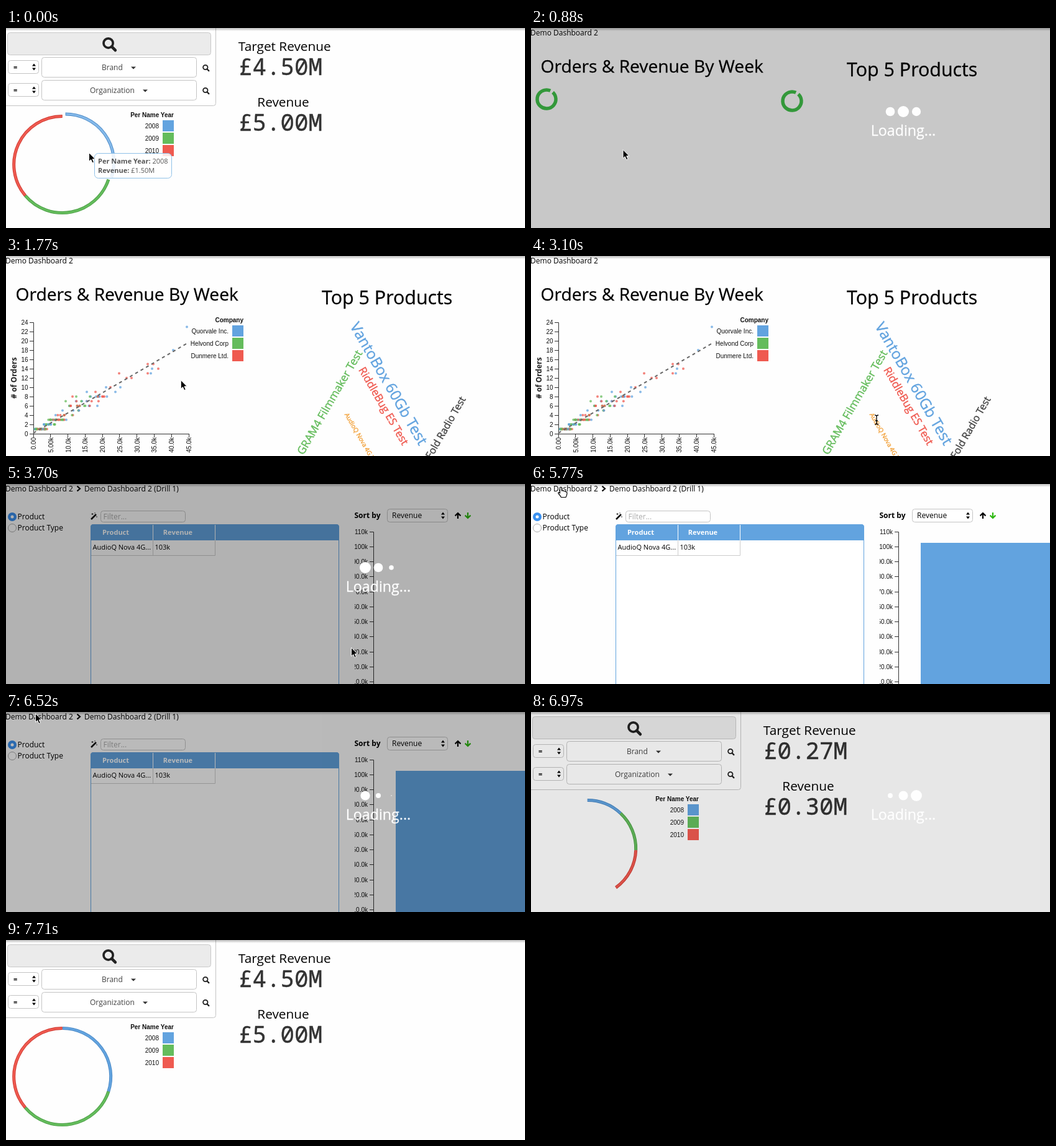
Write an HTML page that moves like this. It is 835 px wide and 323 px high and loops after 8310 ms.

```html
<!DOCTYPE html>
<html lang="en">
<head>
<meta charset="utf-8">
<title>Dashboard drill-down</title>
<style>
  html, body { margin: 0; width: 100%; height: 100%; overflow: hidden; background: #fefefe; }
  svg { display: block; width: 835px; height: 323px; }
  text { font: 12px "Open Sans", "Noto Sans", sans-serif; fill: #000; white-space: pre; }
  .axis text, .legend text { font: 10px "Liberation Sans", Arial, sans-serif; fill: #111; }
  .legend text { text-anchor: end; }
  .legend .head { font-weight: bold; }
  .axis path { stroke: #333; fill: none; }
  .end { text-anchor: end; }
  .mid { text-anchor: middle; }
  .bold { font-weight: bold; }
  .grey { fill: #444; }
  .box { fill: #fff; stroke: #c4c4c4; }
  .title { stroke: #000; stroke-width: .3; }
  .kpi { font-size: 20.8px; }
  .num { font: 37.5px "Noto Sans Mono", "DejaVu Sans Mono", monospace; fill: #333; stroke: #333; stroke-width: .4; }
  .tip text { font-size: 11px; fill: #555; }
  .th { font-size: 11px; font-weight: bold; fill: #fff; text-anchor: middle; }
  .td { font-size: 11px; }
  .cloud text { dominant-baseline: central; stroke-width: .4; }
  .ring { fill: none; stroke: #40c149; stroke-width: 5.5; stroke-dasharray: 89 5.25; }
</style>
</head>
<body>
<svg viewBox="0 0 835 323">
  <defs>
    <linearGradient id="shade" x2="0" y2="1">
      <stop offset="0" stop-color="#000" stop-opacity=".27"/>
      <stop offset="1" stop-color="#000" stop-opacity="0"/>
    </linearGradient>
    <clipPath id="chartClip"><path d="M561 60H835V323H561Z"/></clipPath>
    <g id="lens" fill="none" stroke="#222">
      <circle cx="-.7" cy="-1" r="3.7" stroke-width="1.8"/>
      <path d="M2 1.8L4.8 4.6" stroke-width="2.3" stroke-linecap="round"/>
    </g>
    <path id="updown" d="M-3 -1.5L0 -5.5L3 -1.5ZM-3 1.5L0 5.5L3 1.5Z"/>
    <path id="up" d="M0 5V-3.5M-4.4 .4L0 -4L4.4 .4" fill="none" stroke-width="2.2"/>
    <g id="row">
      <rect class="box" x="3.5" y="52.5" width="49" height="21" rx="4"/>
      <text x="12" y="67" class="bold" style="font-size:11px">=</text>
      <use href="#updown" x="45" y="63"/>
      <rect class="box" x="57.5" y="47.5" width="249" height="32" rx="4"/>
      <use href="#lens" x="321.5" y="64.5"/>
    </g>
  </defs>
  <rect width="835" height="323" fill="#fefefe"/>

  <g id="home">
    <path class="box" d="M-2 -2H337.5V121.5Q337.5 125.5 333.5 125.5H-2Z"/>
    <rect x="2.5" y="7.5" width="327" height="36" rx="4" fill="#ebebeb" stroke="#c8c8c8"/>
    <use href="#lens" transform="translate(166 26.5) scale(2.05)"/>
    <use href="#row"/>
    <text class="grey" x="154" y="68">Brand</text>
    <path d="M201 62.5H209L205 66.5Z" fill="#333"/>
    <use href="#row" y="37"/>
    <text class="grey" x="135" y="105">Organization</text>
    <path d="M220 99.5H228L224 103.5Z" fill="#333"/>
    <text class="kpi" x="373.8" y="37">Target Revenue</text>
    <text class="num" id="target" x="374" y="76"></text>
    <text class="kpi" x="404.3" y="127">Revenue</text>
    <text class="num" id="revenue" x="374" y="166"></text>
    <g id="pie" fill="none"></g>
    <g class="legend" id="years"></g>
    <g class="tip" id="tip">
      <rect x="9.5" y="1.5" width="124" height="40" rx="6" fill="#fff" fill-opacity=".85" stroke="#8fc1e8"/>
      <text x="15" y="18"><tspan class="bold">Per Name Year:</tspan> 2008</text>
      <text x="15" y="33"><tspan class="bold">Revenue:</tspan> £1.50M</text>
    </g>
  </g>

  <g id="board">
    <text x="-1" y="12">Demo Dashboard 2</text>
    <text class="title" x="15.5" y="71.5" style="font-size:28.2px">Orders &amp; Revenue By Week</text>
    <text class="title" x="508" y="77.7" style="font-size:30.4px">Top 5 Products</text>
    <g id="spinners">
      <circle class="ring" r="15"/>
      <circle class="ring" r="15"/>
    </g>
    <g id="scatter">
      <g class="axis" id="plotAxis"></g>
      <text class="bold mid" transform="translate(17 197) rotate(-90)" style="fill:#222"># of Orders</text>
      <g id="dots"></g>
      <path d="M44 286L294 139.5" stroke="#666" stroke-width="2" stroke-dasharray="5 5"/>
      <g class="legend" id="firms"></g>
    </g>
    <g class="cloud" id="cloud"></g>
  </g>

  <g id="drill">
    <text x="-1" y="12">Demo Dashboard 2</text>
    <path d="M114.5 3.5L119 7.5L114.5 11.5" fill="none" stroke="#000" stroke-width="2.2"/>
    <text x="126" y="12">Demo Dashboard 2 (Drill 1)</text>
    <circle cx="10" cy="53" r="7" fill="#3b91f0"/>
    <circle cx="10" cy="53" r="2.5" fill="#fff"/>
    <text x="18.5" y="57">Product</text>
    <circle cx="10" cy="71" r="6.5" fill="#fff" stroke="#aaa"/>
    <text x="18.5" y="75">Product Type</text>
    <path d="M137 57L145 49" stroke="#111" stroke-width="2.5"/>
    <path d="M139 47V50M137.5 48.5H140.5M146 52V54M143 46V47.5" stroke="#222"/>
    <rect class="box" x="152.5" y="43.5" width="136" height="18" rx="4"/>
    <text x="156.5" y="57" style="fill:#aaa">Filter...</text>
    <path d="M136.5 330V69.5Q136.5 65.5 140.5 65.5H531.5Q535.5 65.5 535.5 69.5V330" fill="#fff" stroke="#62a3df"/>
    <path d="M136 91V69.5Q136 65 140.5 65H531.5Q536 65 536 69.5V91Z" fill="#62a3df"/>
    <path d="M236.5 66V91M336.5 66V91" stroke="#fff"/>
    <path d="M236.5 91V115.5M137 115.5H336.5V91" fill="none" stroke="#ccc"/>
    <text class="th" x="176.5" y="82">Product</text>
    <text class="th" x="276.5" y="82">Revenue</text>
    <text class="td" x="139.5" y="106">AudioQ Nova 4G...</text>
    <text class="td" x="239.5" y="106">103k</text>
    <text class="bold" x="560.5" y="55">Sort by</text>
    <rect class="box" x="613.5" y="40.5" width="97" height="21" rx="4"/>
    <text x="621" y="55">Revenue</text>
    <use href="#updown" x="703" y="51"/>
    <use href="#up" x="727" y="51" stroke="#000"/>
    <use href="#up" transform="translate(743 51) scale(1 -1)" stroke="#2eb811"/>
    <g class="axis" id="barAxis" clip-path="url(#chartClip)"></g>
    <rect id="bar" x="627" width="208" fill="#62a3df"/>
  </g>

  <rect width="835" height="5" fill="url(#shade)"/>

  <g id="overlay">
    <rect width="835" height="323" fill="#000" fill-opacity=".3"/>
    <g id="pulse" fill="#fff">
      <circle cx="578" cy="135"/><circle cx="599" cy="135"/><circle cx="620" cy="135"/>
    </g>
    <text class="mid" x="599" y="174" style="font-size:23.2px;fill:#fff;stroke:#fff;stroke-width:.3">Loading...</text>
  </g>

  <g id="cursor" stroke-linejoin="round">
    <path id="pointer" d="M.5 .5V14.5L3.7 11.6L6 16.8L8.4 15.7L6.2 10.7H10.5Z" fill="#000" stroke="#fff"/>
    <path id="beam" d="M-3 -7Q0 -7 0 -5Q0 -7 3 -7M0 -5V6M-3 8Q0 8 0 6Q0 8 3 8M-2 2H2" fill="none" stroke="#000" stroke-width="1.3"/>
    <path id="hand" d="M-1.5 8V1.5Q-1.5 0 0 0T1.5 1.5V6Q4.5 4.8 5 6.7Q7.5 5.8 7.8 7.7Q10 7.3 10 9.5Q10 13 8 16.5H.5Q-1 13.5 -3.8 10.5Q-4.8 8.6 -3 8.4Q-2 8.5 -1.5 10Z" fill="#fff" stroke="#000" stroke-width="1.2"/>
  </g>
</svg>

<script>
const LOOP = 8310, STEP = 148.1, LEAD = 18, LAST = 52;
const BLUE = '#62a3df', GREEN = '#64bc5c', RED = '#ef5a50';
const $ = id => document.getElementById(id);
const clamp = v => Math.max(0, Math.min(1, v));

function add(parent, tag, attrs, text) {
  const el = document.createElementNS('http://www.w3.org/2000/svg', tag);
  for (const name in attrs) el.setAttribute(name, attrs[name]);
  if (text !== undefined) el.textContent = text;
  parent.appendChild(el);
  return el;
}

function show(id, on) {
  $(id).style.display = on ? '' : 'none';
}

// Linear interpolation through rows of [step, ...values]
function track(rows, k) {
  let i = 0;
  while (i < rows.length - 2 && k > rows[i + 1][0]) i++;
  const a = rows[i], b = rows[i + 1];
  const p = clamp((k - a[0]) / (b[0] - a[0]));
  return a.slice(1).map((v, j) => v + (b[j + 1] - v) * p);
}

function legend(id, title, names, right, top) {
  const g = $(id);
  add(g, 'text', { x: right, y: top - 5, class: 'head' }, title);
  [BLUE, GREEN, RED].forEach((fill, i) => {
    const y = top + i * 20;
    add(g, 'rect', { x: right - 18, y, width: 18, height: 18, fill });
    add(g, 'text', { x: right - 24, y: y + 13 }, names[i]);
  });
}

function buildScatter() {
  const axis = $('plotAxis');
  add(axis, 'path', { d: 'M38 107.5H44.5V287.5H294.5V293' });
  for (let n = 0; n <= 24; n += 2) {
    const y = 287 - n * 7.5;
    add(axis, 'path', { d: `M38 ${Math.floor(y) + .5}H44` });
    add(axis, 'text', { x: 35.5, y: y + 3.5, class: 'end' }, n);
  }
  for (let i = 0; i < 10; i++) {
    const x = 44 + i * 27.78;
    add(axis, 'path', { d: `M${Math.floor(x) + .5} 287V293` });
    add(axis, 'text', { transform: `translate(${x + 4} 293) rotate(-90)`, class: 'end' },
      i ? (i * 5).toFixed(i < 2 ? 2 : 1) + 'k' : '0.00');
  }
  let seed = 11;
  const rand = () => (seed = (seed * 16807) % 2147483647) / 2147483647;
  const dot = (cx, n, fill) =>
    add($('dots'), 'circle', { cx, cy: 287 - n * 7.5, r: 2, fill, 'fill-opacity': .75 });
  for (let i = 0; i < 115; i++) {
    const n = 1 + Math.floor(8 * rand() ** 1.8);
    const x = 44 + n * 12.4 + (rand() - .5) * (18 + n * 2.6);
    const low = n < 4 ? .62 : .3, pick = rand();
    dot(Math.max(46, x), n, pick < low ? GREEN : pick < (1 + low) / 2 ? RED : BLUE);
  }
  [[291, 23], [269, 18], [235, 14], [233, 13], [184, 10], [161, 10], [176, 9], [130, 9], [147, 6], [97, 3]]
    .forEach(([x, n]) => dot(x, n, BLUE));
  [[228, 15], [237, 15], [245, 14], [228, 13], [182, 13], [194, 12], [202, 12], [168, 10], [144, 9], [107, 8]]
    .forEach(([x, n]) => dot(x, n, RED));
  dot(113, 8, GREEN);
  dot(96, 7, GREEN);
}

function buildCloud() {
  [['VantoBox 60Gb Test', 617, 205.5, 60, 24, BLUE, 'middle'],
   ['GRAM4 Filmmaker Test', 520, 236, -60, 17.8, GREEN, 'middle'],
   ['RiddleBug ES Test', 608, 242, 60, 17.3, RED, 'middle'],
   ['AudioQ Nova 4G Test', 548, 254, 60, 10, '#f2a23c', 'start'],
   ['Fold Radio Test', 735, 228, -60, 16, '#444', 'end']
  ].forEach(([word, x, y, turn, size, fill, anchor]) =>
    add($('cloud'), 'text', {
      transform: `translate(${x} ${y}) rotate(${turn})`,
      style: `font-size:${size}px;fill:${fill};stroke:${fill};text-anchor:${anchor}`
    }, word));
}

function buildBarAxis() {
  const axis = $('barAxis');
  add(axis, 'path', { d: 'M585 77.5H591.5V323' });
  for (let i = 0; i < 11; i++) {
    const y = 77 + i * 24.25, v = 110 - i * 10;
    add(axis, 'path', { d: `M585 ${Math.floor(y) + .5}H591` });
    add(axis, 'text', { x: 582, y: y + 3.5, class: 'end' }, (v < 100 ? v.toFixed(1) : v) + 'k');
  }
}

const slices = [
  { from: 0, to: 108, fill: BLUE, edge: '#4a89c6' },
  { from: 108, to: 230, fill: GREEN, edge: '#4a9f44' },
  { from: 230, to: 360, fill: RED, edge: '#d0382f' }
];
for (const s of slices) {
  s.rim = add($('pie'), 'path', { stroke: s.edge, 'stroke-width': 5 });
  s.core = add($('pie'), 'path', { stroke: s.fill, 'stroke-width': 3.2 });
}

function arc(from, to) {
  const point = deg => {
    const a = deg * Math.PI / 180;
    return `${90.7 + 78 * Math.sin(a)} ${220.5 - 78 * Math.cos(a)}`;
  };
  return `M${point(from)}A78 78 0 ${to - from > 180 ? 1 : 0} 1 ${point(to)}`;
}

function drawPie(grow, hover) {
  slices.forEach((s, i) => {
    const from = s.from * grow, to = s.to * grow;
    s.rim.setAttribute('d', arc(from, to));
    s.core.setAttribute('d', arc(from + .6 * grow, to - .6 * grow));
    if (i) return;
    const shift = hover ? 'translate(4.9 -3.5)' : '';
    s.rim.setAttribute('transform', shift);
    s.core.setAttribute('transform', shift);
    s.core.setAttribute('stroke', hover ? '#84b9ea' : s.fill);
  });
}

legend('years', 'Per Name Year', ['2008', '2009', '2010'], 270, 149);
legend('firms', 'Company', ['Quorvale Inc.', 'Helvond Corp', 'Dunmere Ltd.'], 382, 112);
buildScatter();
buildCloud();
buildBarAxis();

const mouse = [
  [0, 133, 201], [3, 147.5, 196], [8, 147.5, 196], [16, 414, 204], [20, 588, 243], [21, 556, 264],
  [24, 556, 264], [27, 553, 263], [31, 149, 122], [32, 132, 111], [36, 132, 111],
  [39, 48, 5], [43, 48, 5], [44, 47, 2], [46, 47, -22], [52, 47, -22]
];
const veil = [
  [3, 0], [4, .9], [5, 1], [6, .7], [7, .3], [8, 0], [23, 0], [24, .9], [25, 1], [26, .5],
  [27, .1], [28, 0], [43, 0], [44, .9], [45, 1], [46, .7], [47, .3], [48, 0]
];

// Scale of one loading dot: up over 0.56 s, down over 0.56 s, then rest
function beat(sec) {
  const p = clamp(1 - Math.abs((sec % 1.4) / .56 - 1));
  return p * p * (3 - 2 * p);
}

function render(k) {
  const home = k < 5 || k >= 46, board = k >= 5 && k < 25;
  show('home', home);
  show('board', board);
  show('drill', !home && !board);

  const [x, y] = track(mouse, k);
  $('cursor').setAttribute('transform', `translate(${x} ${y})`);
  const beam = k >= 19 && k < 25, hand = k >= 39 && k < 44;
  show('beam', beam);
  show('hand', hand);
  show('pointer', !beam && !hand);

  if (home) {
    const hover = k < 5;
    drawPie(hover ? 1 : clamp((k - 45) / 5), hover);
    show('tip', hover);
    $('tip').setAttribute('transform', `translate(${x} ${y})`);
    const count = hover ? 1 : clamp((k - 46.7) / 5);
    $('target').textContent = `£${(4.5 * count).toFixed(2)}M`;
    $('revenue').textContent = `£${(5 * count).toFixed(2)}M`;
  }
  if (board) {
    show('spinners', k < 7);
    show('scatter', k >= 7);
    const turn = -48 + (k - 6) * 53;
    [[25, 115], [420, 118]].forEach(([cx, cy], i) =>
      $('spinners').children[i].setAttribute('transform', `translate(${cx} ${cy}) rotate(${turn})`));
    $('cloud').style.opacity = clamp((k - 8) / 4);
  }
  const top = 343.8 - 248.8 * clamp((k - 27) / 3);
  $('bar').setAttribute('y', top);
  $('bar').setAttribute('height', 344 - top);

  const [alpha] = track(veil, k);
  $('overlay').style.opacity = alpha;
  const sec = .1 + (k - (k < 20 ? 4 : k < 40 ? 24 : 44)) * .148;
  [...$('pulse').children].forEach((c, i) =>
    c.setAttribute('r', alpha ? 9 * beat(sec + .16 * (2 - i)) : 0));
}

const start = performance.now();
let shown = -1;
function tick() {
  const t = (performance.now() - start) % LOOP;
  const k = Math.min(LAST, Math.floor((t + LEAD) / STEP));
  if (k !== shown) render(shown = k);
  requestAnimationFrame(tick);
}
tick();
</script>
</body>
</html>
```
